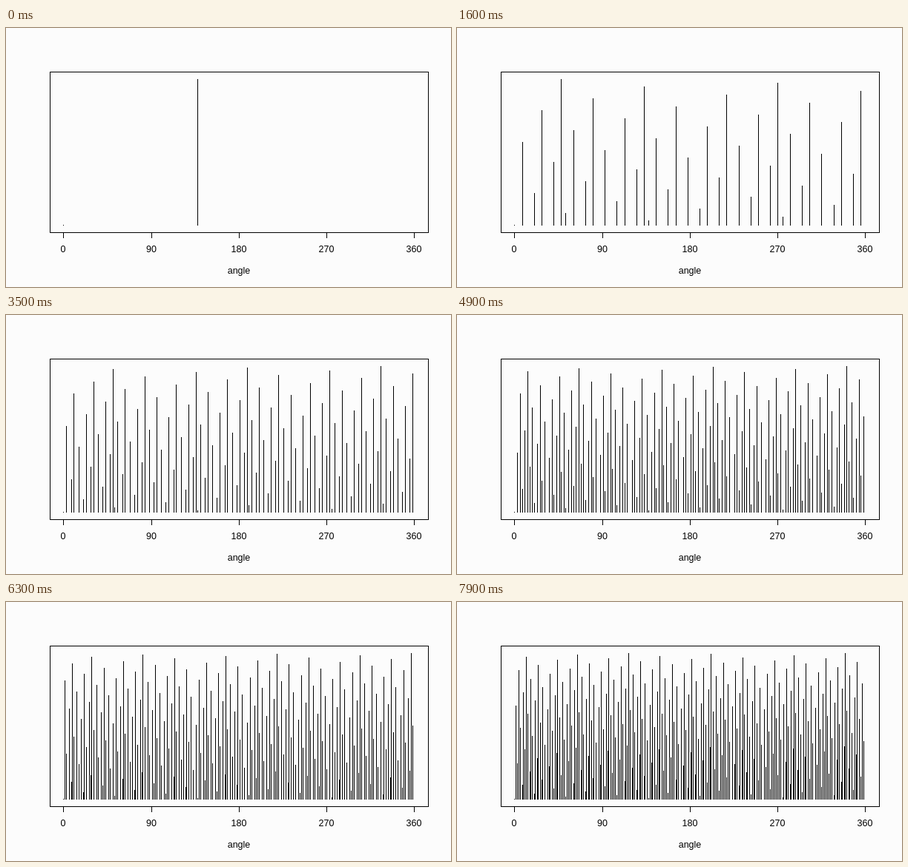
Write an HTML page that moves like this. It is 600x350 px and loops after 8 s.

```html
<!DOCTYPE html>
<html lang="en">
<head>
<meta charset="utf-8">
<title>Golden angle</title>
<style>
  html, body { margin: 0; width: 100%; height: 100%; overflow: hidden; background: #fcfcfc; }
  svg { display: block; }
  text { font: 12.5px "Liberation Sans", Arial, sans-serif; text-anchor: middle; }
</style>
</head>
<body>
<svg width="600" height="350" viewBox="0 0 600 350">
  <rect x="59.5" y="59.5" width="510" height="217" fill="none" stroke="#000" shape-rendering="crispEdges"/>
  <path id="bars" shape-rendering="crispEdges"/>
  <path id="ticks" shape-rendering="crispEdges"/>
  <g id="labels"><text x="314" y="332">angle</text></g>
</svg>
<script>
const LOOP = 8000, STEP = 100;
const GOLDEN = 180 * (3 - Math.sqrt(5));
const BASE = 267;
const byId = id => document.getElementById(id);

const xOf = deg => Math.floor(77.97 + 1.3135 * deg);
const yOf = part => Math.floor(266.3 - 197.2 * part);
const bar = (x, top, bottom) => `M${x} ${top}h1V${bottom}h-1z`;

const marks = [0, 90, 180, 270, 360];
byId('ticks').setAttribute('d', marks.map(m => bar(xOf(m), 276, 284)).join(''));
byId('labels').insertAdjacentHTML('beforeend',
  marks.map(m => `<text x="${xOf(m)}" y="303">${m}</text>`).join(''));

// Two new leaves per step at first, then three; the opening is held twice as long.
function leafCount(t) {
  const step = Math.max(0, Math.floor(t / STEP) - 1);
  return 1 + 2 * step + Math.max(0, step - 9);
}

let shown = 0;
function draw(t) {
  const last = leafCount(t);
  if (last === shown) return;
  shown = last;
  let d = '';
  for (let n = 0; n <= last; n++) {
    d += bar(xOf(n * GOLDEN % 360), yOf(n / last), BASE);
  }
  byId('bars').setAttribute('d', d);
}

const start = performance.now();
function tick() {
  draw((performance.now() - start) % LOOP);
  requestAnimationFrame(tick);
}
tick();
</script>
</body>
</html>
```
